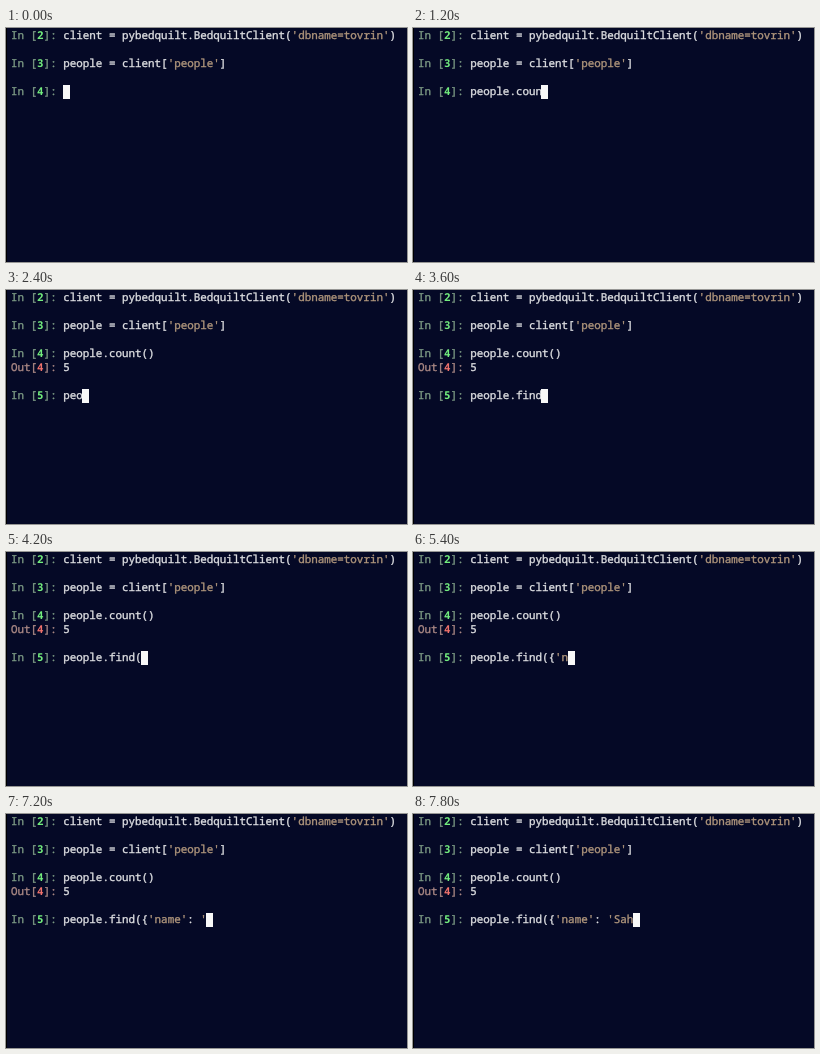
An HTML page that plays this animation: 401 by 234 pixels, repeating every 8 s.

```html
<!DOCTYPE html>
<html lang="en">
<meta charset="utf-8">
<title>Terminal session</title>
<style>
  html, body { margin: 0; width: 100%; height: 100%; overflow: hidden; background: #050926; }
  body { box-shadow: inset 1px 0 #000; }
  pre {
    margin: 0; padding: 1px 0 0 5px; color: #dedfe2;
    font: 500 10.88px/14px "Noto Sans Mono", "DejaVu Sans Mono", monospace;
    text-rendering: geometricPrecision; font-variant-ligatures: none;
    -webkit-text-stroke: 0.35px;
  }
  b { font-weight: 700; -webkit-text-stroke: 0; }
  .in { color: #7c9a84; }
  .in b { color: #72ed7d; }
  .out { color: #ab8985; }
  .out b { color: #f0716c; }
  .str { color: #b0967c; }
  .cursor {
    display: inline-block; width: 7px; height: 14px; margin-left: -0.6px;
    vertical-align: top; background: #f8f8f8;
  }
</style>
<pre id="screen"></pre>
<script>
  const LOOP = 8000, STEP = 600;
  const COUNT = "people.count()", FIND = "people.find({'name': 'Sah";
  // Characters typed at each step, first for COUNT, then for FIND
  const countTyped = [0, 5, 11];
  const findTyped = [0, 3, 8, 11, 12, 13, 15, 19, 20, 22, 25];

  const screen = document.getElementById("screen");
  const cursor = '<span class="cursor"></span>';
  const highlight = code => code.replace(/'[^']*'?/g, '<span class="str">$&</span>');
  const line = (kind, label, n, code) =>
    `<span class="${kind}">${label}[<b>${n}</b>]:</span> ${highlight(code)}`;
  const input = (n, code) => line("in", "In ", n, code);
  const output = (n, value) => line("out", "Out", n, value);

  const history = [
    input(2, "client = pybedquilt.BedquiltClient('dbname=tovrin')"), "",
    input(3, "people = client['people']"), ""
  ];

  function render(step) {
    const lines = [...history];
    if (step < countTyped.length) {
      lines.push(input(4, COUNT.slice(0, countTyped[step])) + cursor);
    } else {
      const typed = FIND.slice(0, findTyped[step - countTyped.length]);
      lines.push(input(4, COUNT), output(4, "5"), "", input(5, typed) + cursor);
    }
    screen.innerHTML = lines.join("\n");
  }

  let shown = -1;
  function tick() {
    const step = Math.floor(performance.now() % LOOP / STEP);
    if (step !== shown) render(shown = step);
    requestAnimationFrame(tick);
  }
  tick();
</script>
</html>
```
